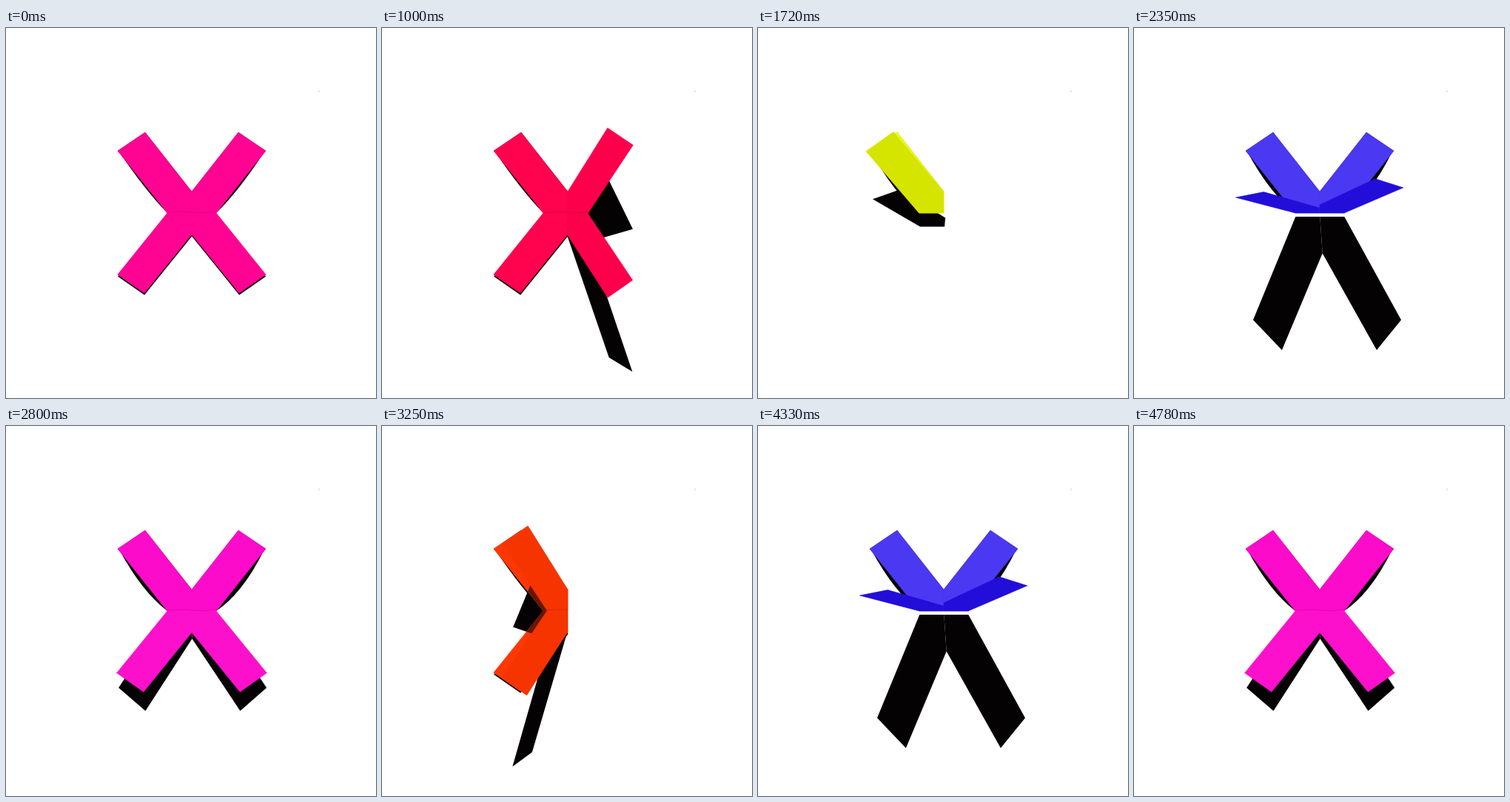
Recreate the animation shown at these times as an HTML page with a canvas. Size 500 by 500 pixels, loop 4.87 s.

```html
<!DOCTYPE html>
<html lang="en">
<head>
<meta charset="utf-8">
<title>Folding paper X</title>
<style>
html, body { margin: 0; width: 100%; height: 100%; overflow: hidden; background: #fff; }
canvas { display: block; width: 500px; height: 500px; }
</style>
</head>
<body>
<canvas id="stage" width="500" height="500"></canvas>
<script>
const ctx = document.getElementById('stage').getContext('2d');
const LOOP = 4870, HOLD = 1000, STEP = 90, CYCLE = 22, REST = 21;
const CX = 251, CY = 250, CAMERA = 700, RAD = Math.PI / 180, FOLDED = 163;

// One quarter of the X, measured from the centre
const UPPER = [[0, 0], [0, -29], [63, -109], [100, -84], [33, 0]];
const LOWER = [[0, 0], [33, 0], [100, 83], [64, 108], [0, 29]];

const clamp = (v, lo = 0, hi = 1) => Math.max(lo, Math.min(hi, v));
const mix = (a, b, u) => a + (b - a) * clamp(u);

// The right half closes in five steps and opens again in five
const sideAngle = k => clamp(36 * Math.min(k + 1, 14 - k), 0, 180);

// The lower half swings up quickly, then eases back down
const flapAngle = k => FOLDED * Math.min(clamp((k - 4) / 4), clamp((REST - k) / 8) ** 1.6);

// Pink to yellow, on to blue, and back to pink
const hueAt = k => mix(342, 424, k / 8) + mix(0, 182, (k - 8) / 7) + mix(0, 80, (k - 15) / 6);

// Fold about the horizontal crease, then the right half about the vertical one
function fold(shape, dir, flap, side, lift) {
  const c = Math.cos(flap * RAD), s = Math.sin(flap * RAD);
  const cs = Math.cos(side * RAD), ss = Math.sin(side * RAD);
  return shape.map(([x, y]) => {
    const z = y * s + lift;
    return dir < 0 ? [-x, y * c, z] : [x * cs - z * ss, y * c, x * ss + z * cs];
  });
}

function project([x, y, z]) {
  const s = CAMERA / (CAMERA - z);
  return [CX + x * s, CY + y * s];
}

function cast([x, y, z]) {
  const h = Math.max(z, 0);
  return [CX + x + 0.12 * h, CY + y + h * (2 + 0.0024 * y)];
}

function trace(points) {
  points.forEach(([x, y], i) => i ? ctx.lineTo(x, y) : ctx.moveTo(x, y));
  ctx.closePath();
}

function fill(points, color) {
  ctx.beginPath();
  trace(points);
  ctx.fillStyle = color;
  ctx.fill();
}

// Light falls from the top of the stage; a flat sheet scores 1
function light(p) {
  const [a, b, c] = [p[0], p[2], p[3]];
  const u = b.map((v, i) => v - a[i]), w = c.map((v, i) => v - a[i]);
  const n = [u[1] * w[2] - u[2] * w[1], u[2] * w[0] - u[0] * w[2], u[0] * w[1] - u[1] * w[0]];
  const len = Math.hypot(...n) * (n[2] < 0 ? -1 : 1);
  return (-0.12 * n[0] - 2 * n[1] + n[2]) / len;
}

function face(p, hue) {
  const blue = Math.max(0, Math.cos((hue - 246) * RAD)) ** 2;
  const shade = clamp(light(p) - 1, -1.5, 0.1) * 9;
  const color = `hsl(${hue % 360}, ${100 - 12 * blue}%, ${50.5 + 8 * blue + shade}%)`;
  fill(p.map(project), color);
  ctx.strokeStyle = color;
  ctx.lineWidth = 0.6;
  ctx.stroke();
}

// Thin curved shadow along the outer edge of an upper arm
function sliver(dir, amount) {
  const x = v => CX + dir * v;
  ctx.beginPath();
  ctx.moveTo(x(97), 169);
  ctx.quadraticCurveTo(x(58 + 1.5 * amount), 218 + 1.2 * amount, x(33), 250);
  ctx.closePath();
  ctx.fillStyle = '#000';
  ctx.fill();
}

function crease(hue, side) {
  ctx.strokeStyle = `hsla(${hue % 360}, 100%, 36%, .45)`;
  ctx.lineWidth = 1;
  ctx.beginPath();
  ctx.moveTo(CX - 33, 249.5);
  ctx.quadraticCurveTo(CX - 11, 247, CX, 249);
  if (side < 60) ctx.quadraticCurveTo(CX + 16, 251, CX + 33 * Math.cos(side * RAD), 248);
  ctx.stroke();
}

function draw(k) {
  const side = sideAngle(k), flap = flapAngle(k), hue = hueAt(k);
  const lift = 1.2 + 8 * (flap / FOLDED) ** 4;
  const curl = 3 + Math.min(flap, 4);
  const lean = 9 * Math.sin(flap * RAD) ** 2;
  const stacked = side === 180;

  const left = [fold(UPPER, -1, 0, 0, 0), fold(LOWER, -1, flap, 0, lift)];
  const right = stacked ? [] : [fold(UPPER, 1, 0, side, 0), fold(LOWER, 1, flap + lean, side, lift)];
  const rightCast = stacked ? [] : [right[0], fold(LOWER, 1, flap, side, lift)];

  ctx.fillStyle = '#fff';
  ctx.fillRect(0, 0, 500, 500);
  ctx.fillStyle = '#ccc';
  ctx.fillRect(422, 85, 2, 1);

  sliver(-1, curl * 0.8);
  if (side === 0) sliver(1, curl);
  const shadows = left.concat(rightCast).map(p => p.map(cast));
  shadows.forEach(p => fill(p, '#050203'));

  left.forEach(p => face(p, hue));

  // The moving half also darkens the paper below it
  if (!stacked && side > 40) {
    ctx.save();
    ctx.beginPath();
    left.forEach(p => trace(p.map(project)));
    ctx.clip();
    shadows.slice(2).forEach(p => fill(p, 'rgba(0,0,0,.6)'));
    ctx.restore();
  }

  if (side > 90) right.reverse();
  right.forEach(p => face(p, hue));
  if (flap < 10 && !stacked) crease(hue, side);
}

const start = performance.now();
function tick() {
  const t = Math.max(0, performance.now() - start) % LOOP;
  const k = t < HOLD ? REST : Math.floor((t - HOLD) / STEP) % CYCLE;
  draw(k === 9 ? 8 : k); // the folded pose stays for two steps
  requestAnimationFrame(tick);
}
tick();
</script>
</body>
</html>
```
